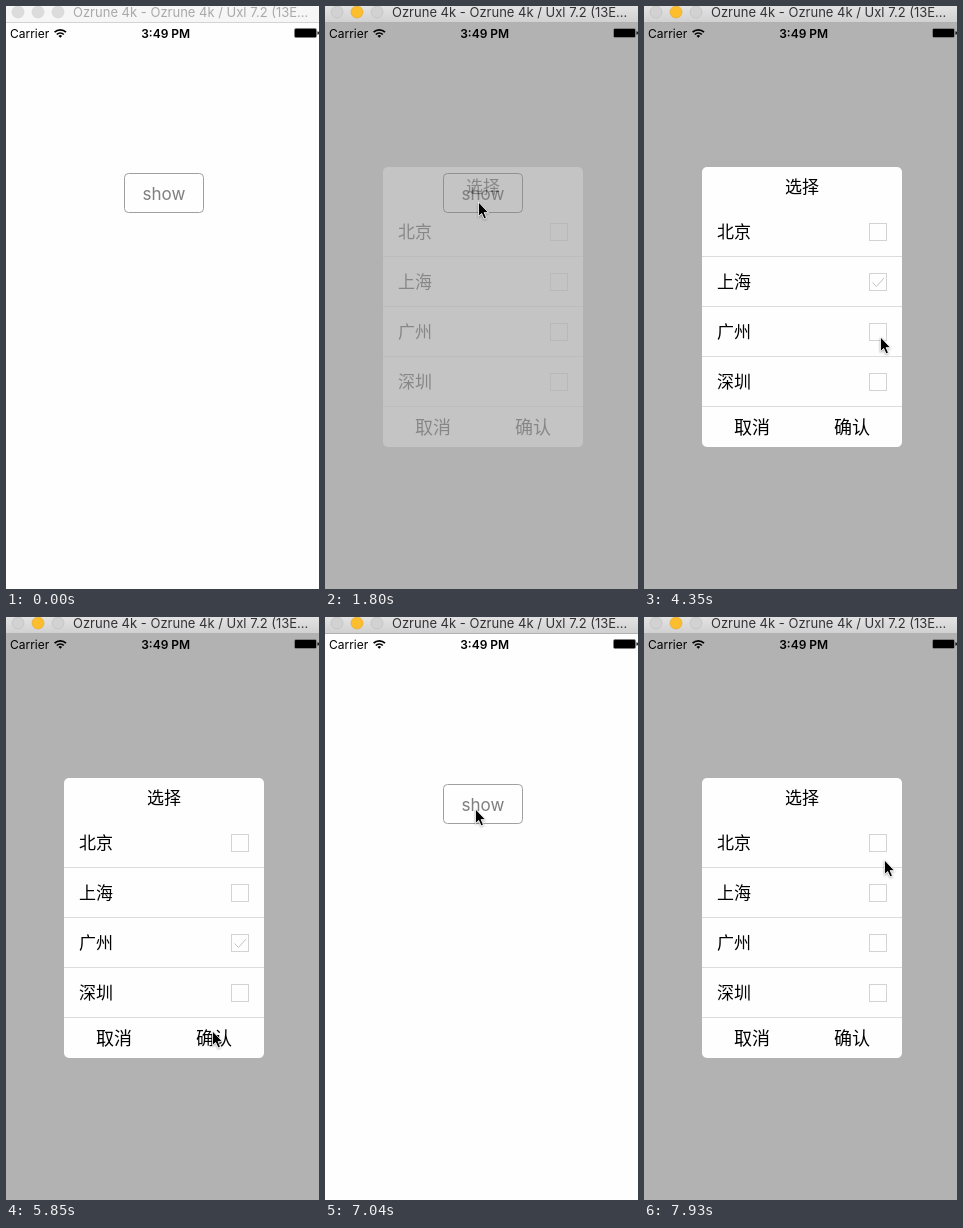
Animation, 313 px wide and 583 px high, one loop 8000 ms. Source, as an HTML page:

```html
<!DOCTYPE html>
<html lang="en">
<head>
<meta charset="utf-8">
<title>Single choice dialog</title>
<style>
  html, body { margin: 0; width: 100%; height: 100%; overflow: hidden; background: #fefefe; }
  svg { display: block; width: 313px; height: 583px; font-family: Inter, Roboto, sans-serif; }
  .mid { text-anchor: middle; }
  .cjk { font-family: "Noto Sans CJK SC", "Noto Sans CJK", sans-serif; font-size: 17px; }
  #bar { fill: #f6f6f6; }
  #edge { fill: #d3d3d3; }
  #title { font-size: 13px; fill: #a9a9a9; }
  .light { fill: #dcdcdc; stroke: #d2d2d2; stroke-width: .6; }
  .active #bar { fill: url(#chrome); }
  .active #edge { fill: #b1b1b1; }
  .active #title { fill: #333136; }
  .active .light { fill: #d2d2d2; stroke: #bcbcbc; }
  .active .light.lit { fill: #fdbe2e; stroke: #e3a429; }
</style>
</head>
<body>
<svg id="stage" viewBox="0 0 313 583">
  <defs>
    <linearGradient id="chrome" x2="0" y2="1">
      <stop stop-color="#e3e3e3"/>
      <stop offset="1" stop-color="#d1d1d1"/>
    </linearGradient>
    <filter id="shadow" x="-50%" y="-50%" width="200%" height="200%">
      <feDropShadow dx="0" dy="1" stdDeviation=".8" flood-opacity=".35"/>
    </filter>
  </defs>
  <rect width="313" height="583" fill="#fefefe"/>

  <rect x="118.5" y="167.5" width="79" height="39" rx="4" fill="none" stroke="#a0a0a0"/>
  <text class="mid" x="158" y="193.5" font-size="17" fill="#7f7f7f">show</text>

  <rect id="shade" y="17" width="313" height="566" opacity=".3"/>
  <g id="dialog" class="cjk">
    <rect x="58" y="161" width="200" height="280" rx="5" fill="#fefefe"/>
    <text class="mid" x="158" y="187.3">选择</text>
    <g id="rows"></g>
    <g class="mid" font-size="18">
      <text x="108" y="428">取消</text>
      <text x="208" y="428">确认</text>
    </g>
  </g>

  <g id="status">
    <text x="4" y="31.5" font-size="12">Carrier</text>
    <g fill="none" stroke="#000" stroke-width="1.7">
      <path d="M48.6 26.2a8 8 0 0 1 11.4 0M50.8 28.5a5 5 0 0 1 7 0"/>
      <path d="M54.3 31.8l-1.8-1.9a2.6 2.6 0 0 1 3.6 0z" fill="#000" stroke="none"/>
    </g>
    <text class="mid" x="159.7" y="31.5" font-size="12" font-weight="600">3:49 PM</text>
    <rect x="288.5" y="22.5" width="22" height="9" rx="1.5" fill="none" stroke="#808080"/>
    <rect x="289" y="23" width="21" height="8" rx=".5"/>
    <path d="M311.5 25.2q1.5.3 1.5 1.8t-1.5 1.8z"/>
  </g>

  <rect id="bar" width="313" height="16"/>
  <rect id="edge" y="16" width="313" height="1"/>
  <circle class="light" cx="12" cy="6" r="6"/>
  <circle class="light lit" cx="32" cy="6" r="6"/>
  <circle class="light" cx="52" cy="6" r="6"/>
  <text id="title" x="67" y="11">Ozrune 4k - Ozrune 4k / Uxl 7.2 (13E...</text>

  <path id="cursor" d="M.5 1V15.4L3.7 12.4 6.1 17.8 8.4 16.8 6.1 11.6H10.4Z"
        stroke="#fff" stroke-width=".8" filter="url(#shadow)"/>
</svg>
<script>
const LOOP = 8000, STEP = 150;
const ACTIVATE = 1650, OPEN = 1800, CLOSE = 6000, REOPEN = 7330;
const byId = id => document.getElementById(id);

const cities = ['北京', '上海', '广州', '深圳'];
byId('rows').innerHTML = cities.map((city, i) => `
  <g transform="translate(0 ${201 + i * 50})">
    <text x="73" y="31.3">${city}</text>
    <rect x="225.5" y="16.5" width="17" height="17" fill="none" stroke="#d3d3d3"/>
    <path class="tick" d="M228.5 25.5l4 4 7.5-8.5" fill="none" stroke="#c4c4c4"/>
    <path d="M58 49.5h200" stroke="#dcdcdc"/>
  </g>`).join('');
const ticks = document.querySelectorAll('.tick');

// The pointer glides to each stop in a few steps, slowing down as it arrives.
const stops = [
  { at: 450, steps: 1, x: 238, y: 491 },
  { at: 600, steps: 1, x: 228, y: 421 },
  { at: 750, steps: 2, x: 130, y: 148 },
  { at: 1050, steps: 3, x: 153, y: 195 },
  { at: 2400, steps: 4, x: 229, y: 225 },
  { at: 3300, steps: 3, x: 243, y: 273 },
  { at: 4050, steps: 4, x: 236, y: 330 },
  { at: 4950, steps: 3, x: 233, y: 358 },
  { at: 5550, steps: 3, x: 206, y: 413 },
  { at: 6290, steps: 6, x: 150, y: 191 },
  { at: 7630, steps: 3, x: 240, y: 242 }
];
const easeOut = p => 1 - (1 - p) ** 4;
const mix = (a, b, p) => a + (b - a) * p;

function cursorAt(t) {
  const i = stops.findLastIndex(stop => t >= stop.at);
  if (i < 0) return null;
  const to = stops[i], from = stops[i - 1] ?? to;
  const step = Math.floor((t - to.at) / STEP) + 1;
  const p = easeOut(Math.min(1, step / to.steps));
  return [mix(from.x, to.x, p), mix(from.y, to.y, p)].map(Math.round);
}

function dialogOpacity(t) {
  if (t < OPEN || (t >= CLOSE && t < REOPEN)) return 0;
  const age = t - (t < CLOSE ? OPEN : REOPEN);
  return age < STEP ? 0.235 : 1;
}

// Every click moves the single tick one row down.
const clicks = [3150, 3900, 4800];
const selectedRow = t => t < CLOSE ? clicks.filter(click => t >= click).length - 1 : -1;

const show = (element, visible) => { element.style.display = visible ? '' : 'none'; };

function render(t) {
  const opacity = dialogOpacity(t), row = selectedRow(t), point = cursorAt(t);
  byId('stage').classList.toggle('active', t >= ACTIVATE);
  show(byId('shade'), opacity > 0);
  byId('dialog').style.opacity = opacity;
  ticks.forEach((tick, i) => show(tick, i === row));
  show(byId('cursor'), point);
  if (point) byId('cursor').setAttribute('transform', `translate(${point})`);
}

const begin = performance.now();
function frame() {
  render((performance.now() - begin) % LOOP);
  requestAnimationFrame(frame);
}
frame();
</script>
</body>
</html>
```
